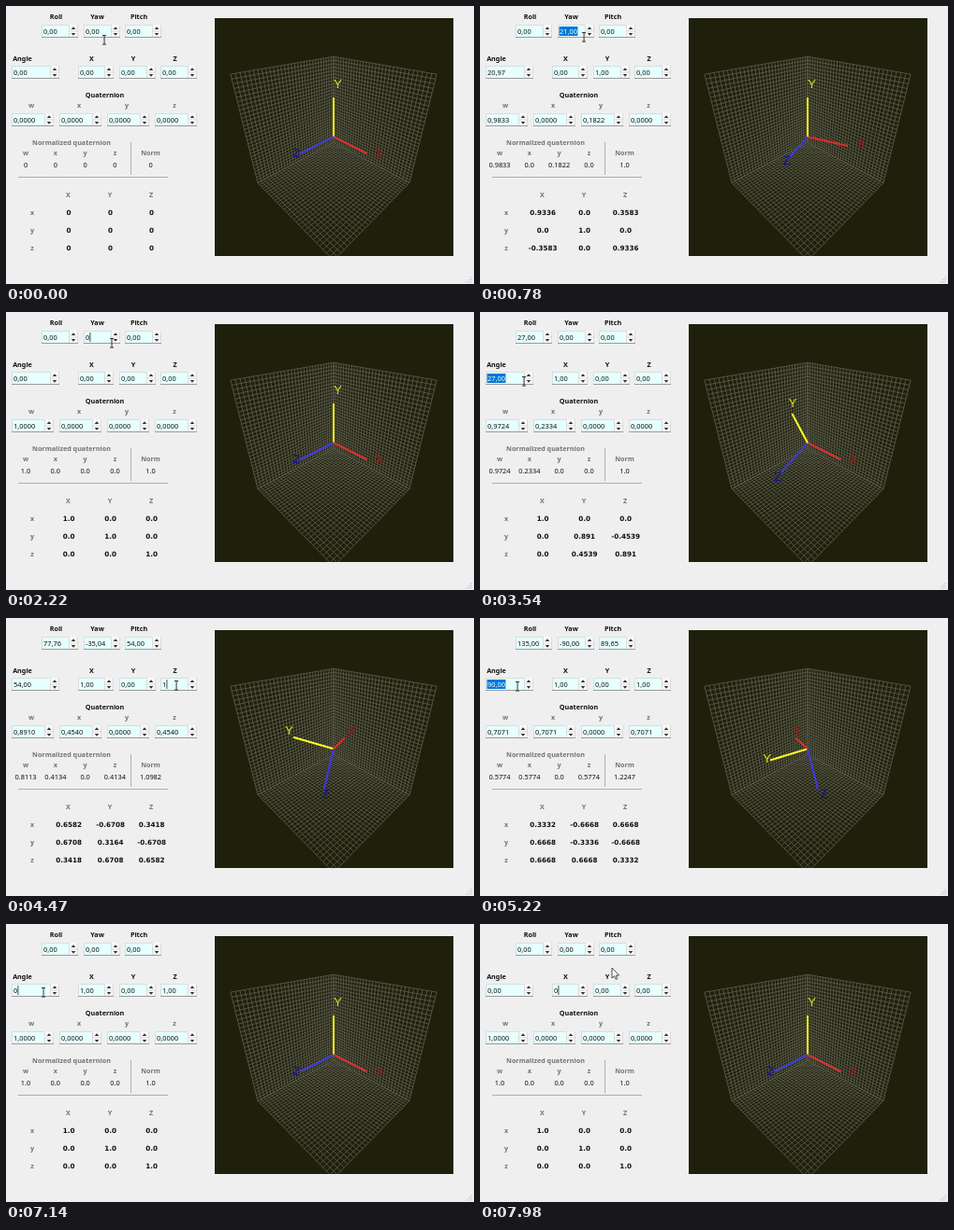
Write an HTML page with a canvas that moves like this. It is 500 px wide and 298 px high and loops after 8 s.

```html
<!DOCTYPE html>
<html lang="en">
<head>
<meta charset="utf-8">
<title>Quaternion viewer</title>
<style>
html, body { margin: 0; width: 100%; height: 100%; overflow: hidden; background: #efefef; }
canvas { display: block; width: 500px; height: 298px; }
</style>
</head>
<body>
<canvas id="stage"></canvas>
<script>
const W = 500, H = 298, LOOP = 8000, STEP = 30;
const canvas = document.getElementById('stage');
const ctx = canvas.getContext('2d');
const dpr = window.devicePixelRatio || 1;
canvas.width = W * dpr;
canvas.height = H * dpr;

const PLAIN = '7.4px "Noto Sans", sans-serif';
const BOLD = 'bold 7.2px "Noto Sans", sans-serif';
const FIGURES = 'bold 7.2px "DejaVu Sans", sans-serif';
const BLACK = '#101010', GREY = '#747474';

// Spin boxes: left, top, width, decimals
const FIELDS = {
  roll: [38, 20, 39, 2], yaw: [83, 20, 39, 2], pitch: [127, 20, 39, 2],
  angle: [6, 64, 51, 2], ax: [77, 64, 38, 2], ay: [121, 64, 39, 2], az: [165, 64, 39, 2],
  qw: [6, 115, 45, 4], qx: [57, 115, 45, 4], qy: [108, 115, 45, 4], qz: [159, 115, 45, 4]
};
const FIELD_H = 14;

// Timelines: [ms, value...]
const YAW = [[300, 0], [1350, 45], [2100, 77]];
const ANGLE = [[2990, 0], [3540, 27], [4080, 54], [4640, 54], [5220, 90],
               [5460, 102], [5670, 102], [6210, 77], [7120, 32]];
const MOUSE = [[0, 105, 36], [250, 111, 33], [1350, 111, 33], [2220, 113, 33], [2340, 113, 33],
               [2600, 92, 72], [2780, 92, 72], [2960, 47, 74], [4110, 47, 74], [4340, 182, 72],
               [4470, 182, 72], [4640, 40, 73], [7200, 40, 73], [7380, 182, 72], [7470, 182, 72],
               [7620, 92, 72], [7770, 92, 72], [7970, 141, 47]];
// Field being edited: [from, to, field, typed text or null for a selection]
const EDITS = [[300, 2160, 'yaw', null], [2160, 2580, 'yaw', '0'], [2610, 2700, 'ax', null],
               [2700, 2880, 'ax', '1'], [2940, 4260, 'angle', null], [4320, 4410, 'az', null],
               [4410, 4560, 'az', '1'], [4620, 7140, 'angle', null], [7140, 7350, 'angle', '0'],
               [7350, 7440, 'az', null], [7440, 7590, 'az', '0'], [7590, 7680, 'ax', null],
               [7680, 8000, 'ax', '0']];

const round = (v, d) => Math.round(v * 10 ** d) / 10 ** d + 0;
const round4 = v => round(v, 4);
const deg = r => r * 180 / Math.PI;
const comma = (v, d) => round(v, d).toFixed(d).replace('.', ',');
const dotted = v => Number.isInteger(round4(v)) ? round4(v).toFixed(1) : String(round4(v));

function track(keys, t) {
  if (t <= keys[0][0]) return keys[0].slice(1);
  for (let i = 1; i < keys.length; i++) {
    const a = keys[i - 1], b = keys[i];
    if (t <= b[0]) {
      const k = (t - a[0]) / (b[0] - a[0]);
      return a.slice(1).map((v, j) => v + (b[j + 1] - v) * k);
    }
  }
  return keys[keys.length - 1].slice(1);
}

function stateAt(t) {
  const blank = t <= 300;
  let axis, angle, yaw = 0;
  const byYaw = t < 2640;
  if (byYaw) {
    yaw = t < 2160 ? Math.round(track(YAW, t)[0]) : 0;
    angle = yaw;
    axis = [0, yaw ? 1 : 0, 0];
  } else {
    angle = t < 7140 ? Math.round(track(ANGLE, t)[0]) : 0;
    axis = [t >= 2700 && t < 7680 ? 1 : 0, 0, t >= 4410 && t < 7440 ? 1 : 0];
  }
  const half = angle * Math.PI / 360;
  const q = [Math.cos(half), ...axis.map(v => v * Math.sin(half))].map(round4);
  const norm = Math.hypot(...q);
  const n = q.map(v => round4(v / norm));
  const [w, x, y, z] = n;
  const m = [
    [1 - 2 * (y * y + z * z), 2 * (x * y - w * z), 2 * (x * z + w * y)],
    [2 * (x * y + w * z), 1 - 2 * (x * x + z * z), 2 * (y * z - w * x)],
    [2 * (x * z - w * y), 2 * (y * z + w * x), 1 - 2 * (x * x + y * y)]
  ];
  // Euler angles come from the quaternion before normalizing
  const [a, b, c, d] = q;
  const euler = byYaw ? [0, yaw, 0] : [
    deg(Math.atan2(2 * (b * a - c * d), 1 - 2 * (b * b + d * d))),
    deg(Math.atan2(2 * (c * a - b * d), 1 - 2 * (c * c + d * d))),
    deg(Math.asin(Math.min(1, 2 * (b * c + d * a))))
  ];
  const shown = byYaw ? deg(2 * Math.acos(q[0])) : angle;
  const box = blank ? [0, 0, 0, 0] : q;
  const names = Object.keys(FIELDS);
  const values = {};
  [...euler, shown, ...axis, ...box].forEach((v, i) => values[names[i]] = v);
  return { blank, values, n, norm, m };
}

function text(str, x, y, font, color, align = 'center') {
  ctx.font = font;
  ctx.fillStyle = color;
  ctx.textAlign = align;
  ctx.fillText(str, x, y);
}

function rect(x, y, w, h, color) {
  ctx.fillStyle = color;
  ctx.fillRect(x, y, w, h);
}

function poly(points, color) {
  ctx.beginPath();
  points.forEach(p => ctx.lineTo(p[0], p[1]));
  ctx.closePath();
  ctx.fillStyle = color;
  ctx.fill();
}

function drawField(name, value, edit) {
  const [x, y, w, digits] = FIELDS[name];
  const right = x + w, base = y + 10;
  rect(x, y, w, FIELD_H, '#d9dede');
  rect(x + 1, y + 1, w - 11, FIELD_H - 2, '#e6ffff');
  rect(right - 10, y, 10, FIELD_H, '#f8f8f8');
  rect(right - 10, y + 6.6, 10, 0.7, '#d0d0d0');
  rect(right - 10, y, 0.6, FIELD_H, '#cccccc');
  rect(right - 0.6, y, 0.6, FIELD_H, '#cccccc');
  rect(x, y + FIELD_H - 1, w, 1, '#9a9a9a');
  const cx = right - 5;
  poly([[cx - 2.3, y + 5], [cx + 2.3, y + 5], [cx, y + 2.2]], '#333');
  poly([[cx - 2.3, y + 9], [cx + 2.3, y + 9], [cx, y + 11.8]], '#333');

  const active = edit && edit[2] === name;
  const typed = active ? edit[3] : null;
  const str = typed || comma(value, digits);
  ctx.font = PLAIN;
  const tw = ctx.measureText(str).width;
  const selected = active && !typed;
  if (selected) rect(x + 1.5, y + 2, tw + 1, 10, '#0078d7');
  text(str, x + 2, base, PLAIN, selected ? '#ffffff' : BLACK, 'left');
  if (typed) rect(x + 2.3 + tw, y + 2, 0.8, 10, '#222');
}

function drawForm(s, edit) {
  [['Roll', 53.5], ['Yaw', 97.5], ['Pitch', 142]].forEach(l => text(l[0], l[1], 13.6, BOLD, BLACK));
  [['Angle', 17.5], ['X', 91.5], ['Y', 136], ['Z', 180.5]].forEach(l => text(l[0], l[1], 58.5, BOLD, BLACK));
  text('Quaternion', 105.5, 98, BOLD, BLACK);
  ['w', 'x', 'y', 'z'].forEach((l, i) => {
    text(l, [27, 78, 129, 180][i], 109.3, BOLD, GREY);
    text(l, 21 + i * 31.8, 160, BOLD, GREY);
    text(s.blank ? '0' : dotted(s.n[i]), 21 + i * 31.8, 172.8, PLAIN, BLACK);
  });
  for (const name in FIELDS) drawField(name, s.values[name], edit);

  text('Normalized quaternion', 70, 148.8, BOLD, GREY);
  text('Norm', 154.5, 160, BOLD, GREY);
  text(s.blank ? '0' : dotted(s.norm), 154.5, 172.8, PLAIN, BLACK);
  rect(133, 146, 0.9, 35, '#a8a8a8');
  rect(13, 183, 160, 0.9, '#a8a8a8');

  const cols = [66.5, 111, 155];
  ['X', 'Y', 'Z'].forEach((l, i) => {
    const y = 224 + i * 19;
    text(l, cols[i], 204.8, BOLD, GREY);
    text(l.toLowerCase(), 28, y, BOLD, GREY);
    cols.forEach((x, j) => text(s.blank ? '0' : dotted(s.m[i][j]), x + 0.6, y, FIGURES, BLACK));
  });
  for (let i = 0; i < 3; i++)
    for (let j = 0; j <= i; j++) rect(496.5 - j * 2.4, 290.5 + i * 2.4, 1.1, 1.1, '#b4b4b4');
}

// Camera on the diagonal between X and Z, aimed at the origin
const DIST = 10, FOCAL = 220, SIN = 0.508, COS = Math.sqrt(1 - SIN * SIN);
function project([x, y, z]) {
  const near = (x + z) * Math.SQRT1_2;
  const depth = near * COS + y * SIN;
  const k = FOCAL / (DIST - depth);
  return [350 + (x - z) * Math.SQRT1_2 * k, 140.2 - (y * COS - near * SIN) * k, depth];
}

function drawGrid() {
  const A = 3, N = 30;
  const line = (p, q) => {
    ctx.moveTo(...project(p).slice(0, 2));
    ctx.lineTo(...project(q).slice(0, 2));
  };
  ctx.beginPath();
  for (let i = 0; i <= N; i++) {
    const v = -A + 2 * A * i / N;
    for (let fixed = 0; fixed < 3; fixed++) {
      const plane = (u, w) => {
        const p = [u, w];
        p.splice(fixed, 0, -A);
        return p;
      };
      line(plane(v, -A), plane(v, A));
      line(plane(-A, v), plane(A, v));
    }
  }
  ctx.strokeStyle = '#66665a';
  ctx.lineWidth = 0.7;
  ctx.stroke();
}

const AXES = [['X', '#e02c2c', '#a01212'], ['Y', '#ffff24', '#dcdc28'], ['Z', '#3a3ae6', '#1212a0']];
function drawScene(m) {
  ctx.save();
  ctx.beginPath();
  ctx.rect(223, 13, 255, 255);
  ctx.clip();
  rect(223, 13, 255, 255, '#1f200b');
  drawGrid();
  const origin = project([0, 0, 0]);
  AXES.map(([label, color, ink], i) => {
    const dir = m.map(row => row[i]);
    return { label, color, ink, tip: project(dir.map(v => v * 2)), tag: project(dir.map(v => v * 2.4)) };
  }).sort((a, b) => a.tip[2] - b.tip[2]).forEach(a => {
    ctx.beginPath();
    ctx.moveTo(origin[0], origin[1]);
    ctx.lineTo(a.tip[0], a.tip[1]);
    ctx.strokeStyle = a.color;
    ctx.lineWidth = 2;
    ctx.stroke();
    text(a.label, a.tag[0], a.tag[1], '13.5px "Liberation Sans", sans-serif', a.ink, 'left');
  });
  ctx.restore();
}

function drawMouse(x, y) {
  const overField = Object.values(FIELDS).some(([fx, fy, w]) =>
    x > fx && x < fx + w - 4 && y > fy - 2 && y < fy + FIELD_H + 3);
  if (overField) {
    rect(x - 0.4, y - 4.5, 0.9, 9.5, '#222');
    rect(x - 2, y - 5, 4, 0.9, '#222');
    rect(x - 2, y + 4.6, 4, 0.9, '#222');
    return;
  }
  const shape = [[0, 0], [0, 11], [2.5, 8.7], [4.2, 12.4], [5.8, 11.7], [4.2, 8.1], [7.6, 8]]
    .map(p => [x + p[0], y + p[1]]);
  poly(shape, '#ffffff');
  ctx.strokeStyle = '#222';
  ctx.lineWidth = 0.8;
  ctx.stroke();
}

function render(now) {
  const t = Math.floor(now % LOOP / STEP) * STEP;
  const s = stateAt(t);
  const edit = EDITS.find(e => t >= e[0] && t < e[1]);
  ctx.setTransform(dpr, 0, 0, dpr, 0, 0);
  rect(0, 0, W, H, '#efefef');
  drawForm(s, edit);
  drawScene(s.m);
  drawMouse(...track(MOUSE, t));
}

let start = null;
function tick(now) {
  if (start === null) start = now;
  render(now - start);
  requestAnimationFrame(tick);
}
render(0);
requestAnimationFrame(tick);
</script>
</body>
</html>
```
